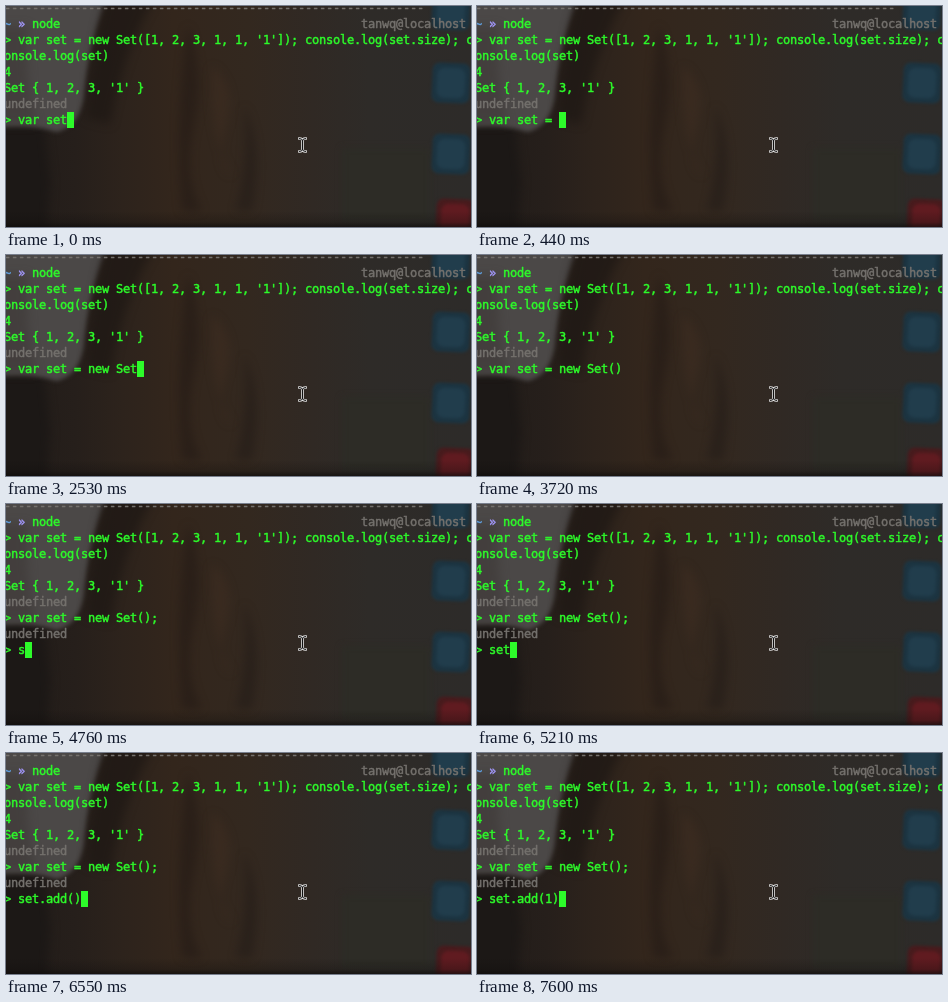
An HTML page with a canvas for the animation above (8000 ms loop, 465x221 px).

```html
<!DOCTYPE html>
<html lang="en">
<head>
<meta charset="utf-8">
<title>Terminal session</title>
<style>
  html, body { margin: 0; width: 100%; height: 100%; overflow: hidden; background: #2b2521; }
  canvas { display: block; width: 465px; height: 221px; }
</style>
</head>
<body>
<canvas id="stage" width="465" height="221"></canvas>
<script>
const W = 465, H = 221, LOOP = 8000;
const CELL = 7, LINE = 16, LEFT = -2, TOP = 10;
const GREEN = '#2dfb2a', GRAY = '#74716d';
const ctx = document.getElementById('stage').getContext('2d');

const FIRST = '> var set = new Set();';
// [start ms, number of characters typed]
const firstSteps = [[0, 9], [140, 10], [290, 11], [440, 12], [1340, 13], [1480, 15],
  [1780, 16], [2230, 17], [2530, 19], [3120, 21], [4020, 22]];
// [start ms, visible text, cursor column when not at the end]
const secondSteps = [[4320, '> '], [4760, '> s'], [5060, '> se'], [5210, '> set'],
  [5510, '> set.'], [5660, '> set.a'], [5810, '> set.ad'], [6100, '> set.add'],
  [6550, '> set.add()'], [7300, '> set.add(1)', 11], [7600, '> set.add(1)']];

const stepAt = (steps, t) => steps.filter(s => s[0] <= t).pop();

// Soft-edged area of the blurred photo behind the window
function area(g, path, color, blur) {
  g.filter = `blur(${blur}px)`;
  g.fillStyle = color;
  g.fill(new Path2D(path));
  g.filter = 'none';
}

function tile(g, x, y, edge, inner) {
  g.save();
  g.translate(x, y);
  g.rotate(0.05);
  g.filter = 'blur(1.5px)';
  [[edge, 19, 20], [inner, 14, 15]].forEach(([color, rx, ry]) => {
    g.fillStyle = color;
    g.beginPath();
    g.roundRect(-rx, -ry, 2 * rx, 2 * ry, 7);
    g.fill();
  });
  g.restore();
}

function makeBackdrop() {
  const c = document.createElement('canvas');
  c.width = W;
  c.height = H;
  const g = c.getContext('2d');
  const base = g.createLinearGradient(0, 0, W, 0);
  [[0, '#211c19'], [0.15, '#261f1b'], [0.25, '#2d231c'], [0.36, '#33261c'], [0.52, '#33281f'],
    [0.66, '#302924'], [0.78, '#2e2b28'], [1, '#2d2b29']].forEach(s => base.addColorStop(...s));
  g.fillStyle = base;
  g.fillRect(0, 0, W, H);

  area(g, 'M-9 120H38L44 175L40 230H-9Z', '#1c1816', 5);
  area(g, 'M-9 -9H102Q92 15 86 40T78 92Q72 122 50 126Q28 118 -9 121Z', '#4b4847', 2);
  area(g, 'M-9 20H22Q18 70 30 118H-9Z', 'rgba(62,58,56,0.6)', 5);
  area(g, 'M100 -9H150Q118 40 104 118L80 112Q84 50 100 -9Z', 'rgba(31,24,20,0.75)', 5);
  area(g, 'M182 20Q200 70 188 120T196 205H176Q168 110 182 20Z', 'rgba(37,28,23,0.6)', 4);
  area(g, 'M206 60Q232 80 220 120T226 170Q202 130 206 60Z', 'rgba(64,47,35,0.5)', 4);
  area(g, 'M238 100Q258 140 246 205H230Q244 150 238 100Z', 'rgba(35,28,24,0.55)', 4);
  area(g, 'M336 142H424V216H336Z', '#2d2c26', 3);

  tile(g, 445, 4, '#1c3441', '#213d4c');
  tile(g, 445, 77, '#1c3441', '#213d4c');
  tile(g, 445, 148, '#1c3441', '#213d4c');
  tile(g, 449, 213, '#481b1d', '#601b20');

  const shade = g.createLinearGradient(0, 205, 0, H);
  shade.addColorStop(0, 'rgba(14,12,11,0)');
  shade.addColorStop(0.7, 'rgba(14,12,11,0.25)');
  shade.addColorStop(1, 'rgba(14,12,11,0.7)');
  g.fillStyle = shade;
  g.fillRect(0, 205, W, 16);
  return c;
}

function print(text, row, col = 0, color = GREEN) {
  ctx.fillStyle = ctx.strokeStyle = color;
  ctx.lineWidth = 0.45;
  [...text].forEach((ch, i) => {
    const x = LEFT + CELL * (col + i), y = TOP + LINE * row + 12;
    ctx.fillText(ch, x, y);
    ctx.strokeText(ch, x, y);
  });
}

function cursor(row, col, under = '') {
  ctx.fillStyle = GREEN;
  ctx.fillRect(LEFT + CELL * col, TOP + LINE * row, CELL, LINE);
  print(under, row, col, '#1c2a18');
}

function pointer() {
  const p = new Path2D('M293.5 132.5Q296.5 132.5 296.5 135Q296.5 132.5 299.5 132.5' +
    'M296.5 135V143M293.5 145.5Q296.5 145.5 296.5 143Q296.5 145.5 299.5 145.5');
  ctx.lineCap = 'square';
  [['#e6e6e6', 2.6], ['#111', 1]].forEach(([color, width]) => {
    ctx.strokeStyle = color;
    ctx.lineWidth = width;
    ctx.stroke(p);
  });
}

const backdrop = makeBackdrop();

function draw(t) {
  ctx.drawImage(backdrop, 0, 0);
  ctx.font = '12px "DejaVu Sans Mono", monospace';
  ctx.textBaseline = 'alphabetic';
  ctx.lineJoin = 'round';

  print('-'.repeat(60), -1, 0, GRAY);
  print('~', 0, 0, '#5f9fe0');
  print('»', 0, 2, '#a297fa');
  print('node', 0, 4);
  print('tanwq@localhost', 0, 51, GRAY);
  print("> var set = new Set([1, 2, 3, 1, 1, '1']); console.log(set.size); c", 1);
  print('onsole.log(set)', 2);
  print('4', 3);
  print("Set { 1, 2, 3, '1' }", 4);
  print('undefined', 5, 0, GRAY);

  const count = stepAt(firstSteps, t)[1];
  print(FIRST.slice(0, count), 6);
  if (t < 4170) {
    if (t < 3720 || t >= 4020) cursor(6, count);
  } else if (t < 4320) {
    cursor(7, 0);
  } else {
    print('undefined', 7, 0, GRAY);
    const [, text, col = text.length] = stepAt(secondSteps, t);
    print(text, 8);
    cursor(8, col, text[col]);
  }
  pointer();
}

const start = performance.now();
function tick() {
  draw((performance.now() - start) % LOOP);
  requestAnimationFrame(tick);
}
tick();
</script>
</body>
</html>
```
